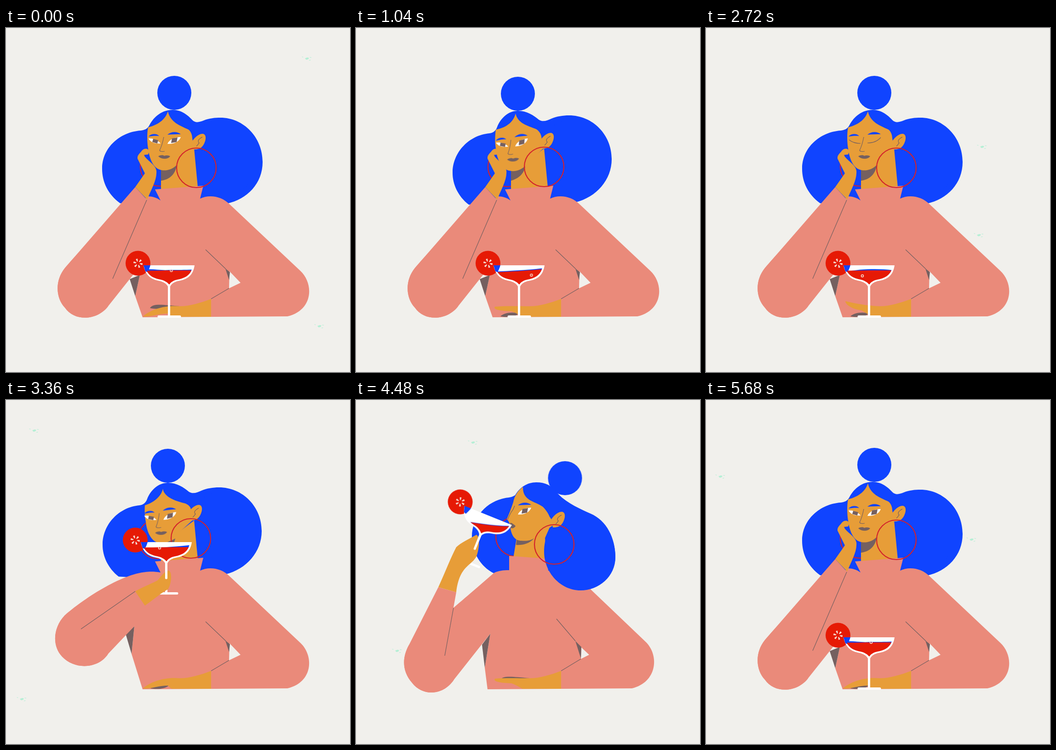
Animation of 748x748 px, one loop 5.76 s. Source, as an HTML page without scripts:

```html
<!DOCTYPE html>
<html lang="en">
<head>
<meta charset="utf-8">
<title>Cocktail hour</title>
<style>
html, body { margin: 0; width: 100%; height: 100%; overflow: hidden; background: #f1f0ec; }
svg { display: block; width: 100vw; height: 100vh; }
svg * { animation: 5.76s ease-in-out infinite; }

.blue { fill: #1044ff; }
.skin { fill: #e79d38; }
.knit { fill: #ea8a7a; }
.shade { fill: #756060; }
.white { fill: #fff; }
.red { fill: #e61a05; }
.paper { fill: #f1f0ec; }
.line { fill: none; stroke: #756060; stroke-width: 1.2; }
.hoop { fill: none; stroke: #d3202c; stroke-width: 2.2; }
.stem { fill: none; stroke: #fff; stroke-width: 5; stroke-linecap: round; }

/* head */
.bun { animation-name: bun; }
@keyframes bun {
  0%, 6%, 31%, 48%, 95%, 100% { transform: none; }
  16%, 21%, 57%, 59% { transform: translate(-14px, 2px); }
  67%, 80% { transform: translate(88.5px, 29px); }
}
.hair { animation-name: hair; }
@keyframes hair {
  0%, 6%, 31%, 48%, 95%, 100% { d: path("M362 178C382 178 396 190 405 200C412 207 420 205 430 201C442 196 455 195 466 195C517 195 558 238 558 291C558 338 525 372 480 382L360 390L248 381C222 362 209 335 209 306C209 260 248 226 293 223C302 222 308 219 312 211C322 192 340 178 362 178Z"); }
  16%, 21%, 57%, 59% { d: path("M352 180C372 180 386 190 397 199C405 205 415 202 425 197C437 192 450 190 463 190C515 190 556 232 556 285C556 330 523 368 477 379L360 390L245 384C222 366 210 340 210 315C210 270 246 233 290 229C298 228 304 224 307 215C315 195 332 180 352 180Z"); }
  67%, 80% { d: path("M392 179C412 179 425 186 436 200C442 208 452 217 462 224C475 232 490 239 505 246C540 258 564 300 564 340C564 380 530 414 488 414L400 370L300 377C270 362 252 330 252 297C252 255 285 220 325 213C333 212 340 211 346 207C356 190 372 179 392 179Z"); }
}
.lock { animation-name: lock; }
@keyframes lock {
  0%, 59%, 91%, 100% { d: path("M425 215C440 205 455 200 466 200C512 200 548 240 548 288C548 330 520 356 480 360C455 360 435 330 432 315C430 290 430 270 430 262Z"); }
  67%, 80% { d: path("M440 205C460 225 490 238 510 247C545 262 564 300 564 342C564 384 528 414 488 414C445 414 409 375 409 330C409 300 420 280 432 270Z"); }
}
.neck { animation-name: neck; }
@keyframes neck {
  0%, 59%, 95%, 100% { d: path("M337 300L337 352L417 346L409 262L372 290Z"); }
  67%, 80% { d: path("M350 295L342 344L414 348L411 300L422 275Z"); }
}
.chin { animation-name: chin; }
@keyframes chin {
  0%, 6%, 31%, 48%, 95%, 100% { d: path("M337 304C350 308 362 304 371 298C369 318 355 330 337 332Z"); }
  16%, 21%, 57%, 59% { d: path("M337 308C350 310 360 306 368 301C365 318 352 328 337 332Z"); }
  67%, 80% { d: path("M350 300C360 304 375 304 387 301C376 313 362 316 348 315Z"); }
}
.face { animation-name: face; }
@keyframes face {
  0%, 6%, 31%, 48%, 95%, 100% { d: path("M352 181C348 196 334 210 309 216C306 230 307 250 309 262C312 285 320 302 332 307C345 313 362 308 371 298L409 264L405 240C405 234 403 226 397 221C378 212 357 205 352 181Z"); }
  16%, 21% { d: path("M347 186C343 202 330 216 304 221C302 235 302 250 304 262C306 285 316 303 329 309C343 314 358 310 367 300L407 262L403 236C402 230 398 224 392 220C373 212 352 208 347 186Z"); }
  57%, 59% { d: path("M341 193C339 206 325 222 302 229C301 240 302 255 304 265C306 285 314 303 327 309C340 314 356 310 363 300L405 262L402 238C401 232 397 228 390 225C370 220 344 212 341 193Z"); }
  67%, 80% { d: path("M363 189C352 196 344 210 342 222C338 235 331 252 328 259C333 264 335 270 336 280C339 296 346 306 360 306C370 307 380 306 388 300L432 270L421 254C418 246 412 238 406 232C390 220 362 220 363 189Z"); }
}
.features { transform-origin: 345px 262px; animation-name: features; }
@keyframes features {
  0%, 6%, 31%, 48%, 67%, 80%, 95%, 100% { transform: none; }
  16%, 21% { transform: translate(-4px, 6px) rotate(-5deg); }
  57%, 59% { transform: translate(-8px, 9px) rotate(-4deg); }
}
.far { animation-name: far; }
@keyframes far {
  0%, 61%, 88%, 100% { opacity: 1; transform: none; }
  63%, 85% { opacity: 0; transform: translate(8px, 0); }
}
.near { animation-name: near; }
@keyframes near {
  0%, 59%, 95%, 100% { transform: none; }
  67%, 80% { transform: translate(1px, -3px); }
}
.open { animation: open 5.76s step-end infinite; }
@keyframes open { 0%, 49.9% { opacity: 1; } 45.8% { opacity: 0; } }
.shut { animation: shut 5.76s step-end infinite; }
@keyframes shut { 0%, 49.9% { opacity: 0; } 45.8% { opacity: 1; } }
.nose { animation-name: nose; }
@keyframes nose {
  0%, 59%, 95%, 100% { d: path("M343 237C341 248 338 258 334 266C335 269 341 269 345 268"); }
  67%, 80% { d: path("M345 230C343 235 341 240 338 243C334 250 331 256 330 260"); }
}
.mouth { animation-name: mouth; }
@keyframes mouth {
  0%, 59%, 95%, 100% { d: path("M331 279C336 276 341 276 344 278C350 276 354 277 357 279C352 286 338 286 331 279Z"); }
  67%, 80% { d: path("M335 267C338 267 340 268 342 270C344 271 345 272 347 274C344 279 339 280 336 278Z"); }
}
.ear { animation-name: ear; }
@keyframes ear {
  0%, 6%, 31%, 48%, 95%, 100% { transform: none; }
  16%, 21% { transform: translate(-4px, -2px); }
  57%, 59% { transform: translate(-8px, -2px); }
  67%, 80% { transform: translate(20px, 13px); }
}
.hoop { animation-name: hoop; }
@keyframes hoop {
  0%, 6%, 31%, 48%, 95%, 100% { transform: none; }
  16%, 21% { transform: translate(-5px, -2px); }
  57%, 59% { transform: translate(-12px, -3px); }
  67%, 80% { transform: translate(17px, 10px); }
}
.hoop.back { animation-name: hoop-back; }
@keyframes hoop-back {
  0%, 6%, 31%, 48%, 95%, 100% { transform: none; }
  16%, 21%, 57%, 59% { transform: translate(-5px, 1px); }
  67%, 80% { transform: translate(12px, -4px); }
}

/* torso */
.torso { animation-name: torso; }
@keyframes torso {
  0%, 47.2%, 91%, 100% { d: path("M324 351L429 343L422 371C440 362 468 364 487 384L640 528C670 556 668 614 612 627L297 629L281 583L291 537L308 366C318 366 328 369 336 375Z"); }
  58.3% { d: path("M324 351L429 343L422 371C440 362 468 364 487 384L640 528C670 556 668 614 612 627L297 629L273 552L279 492L303 374C312 373 325 373 336 375Z"); }
  67%, 80% { d: path("M333 339L416 345L418 371C440 372 478 385 500 402L630 526C660 555 655 614 600 627L286 629L280 582L292 508L300 376C310 371 320 370 333 370Z"); }
}
.pit { animation-name: pit; }
@keyframes pit {
  0%, 47.2%, 91%, 100% { d: path("M269 546L291 537L281 583Z"); }
  58.3% { d: path("M260 508L279 492L273 552Z"); }
  67%, 80% { d: path("M274 532L292 508L280 582Z"); }
}
.gap { animation-name: gap; }
@keyframes gap {
  0%, 59%, 91%, 100% { d: path("M486 529L510 554L485 566Z"); }
  67%, 80% { d: path("M490 538L507 554L489 563Z"); }
}
.fold { animation-name: fold; }
@keyframes fold {
  0%, 59%, 91%, 100% { d: path("M477 523L487 531L485 548Z"); }
  67%, 80% { d: path("M477 524L490 537L489 562Z"); }
}
.crease { animation-name: crease; }
@keyframes crease {
  0%, 59%, 91%, 100% { d: path("M434 482L478 524M446 589L485 566"); }
  67%, 80% { d: path("M436 476L477 524M446 589L489 563"); }
}

/* lifting arm: cheek, table, chest, lips */
.upper { animation-name: upper; }
@keyframes upper {
  0%, 47.2%, 95%, 100% { d: path("M308 367L330 420L280 532L222 605C200 635 150 640 128 608C107 585 107 548 128 522C170 474 200 440 308 367Z"); }
  52%, 89% { d: path("M306 370L335 420L285 510L222 590C202 622 150 628 124 598C103 575 103 535 128 505C170 460 220 400 306 370Z"); }
  58.3%, 84.5% { d: path("M305 374L335 420L279 492C252 514 238 532 222 552C202 584 150 588 122 558C100 535 102 495 128 468C165 435 250 378 305 374Z"); d: path("M305 374L335 420L279 492L222 552C202 584 150 588 122 558C100 535 102 495 128 468C165 435 250 378 305 374Z"); }
  66%, 80% { d: path("M300 376L330 420L292 508L213 608C190 643 145 645 122 615C100 590 100 560 115 533C180 480 212 452 300 376Z"); }
}
.fore { animation-name: fore; }
@keyframes fore {
  0%, 47.2%, 95%, 100% { d: path("M281 346L306 373L232 544L222 605C200 635 150 640 128 608C107 585 107 548 128 522Z"); }
  52%, 89% { d: path("M262 548L270 590L235 600L222 605C200 635 150 636 124 605C103 580 103 545 128 515Z"); }
  58.3%, 84.5% { d: path("M281 416L302 447L240 520L222 552C202 584 150 588 122 558C100 535 102 495 128 468Z"); }
  66%, 80% { d: path("M179 407L218 418L193 556L213 608C190 643 145 645 122 615C100 590 100 560 115 533Z"); }
}
.seam { animation-name: seam; }
@keyframes seam {
  0%, 47.2%, 95%, 100% { d: path("M306 374L232 545"); }
  52%, 89% { d: path("M262 548L180 540"); }
  58.3%, 84.5% { d: path("M281 416L163 498"); }
  66%, 80% { d: path("M212 452L193 556"); }
}
.cheek { animation: cheek 5.76s step-end infinite; }
@keyframes cheek { 0%, 94.5% { opacity: 1; } 47.6% { opacity: 0; } }
.grip { animation-name: grip, grip-on; animation-timing-function: ease-in-out, step-end; }
@keyframes grip-on { 0%, 94.5% { opacity: 0; } 47.6% { opacity: 1; } }
@keyframes grip {
  0%, 47.2%, 95%, 100% { d: path("M281 346C285 330 300 310 302 300C300 280 310 265 318 268C330 290 335 310 327 330C320 350 312 360 306 373Z"); }
  52%, 89% { d: path("M262 548C290 552 310 560 328 566C338 562 348 560 354 562C364 567 362 592 354 600C340 606 300 600 270 590Z"); }
  58.3%, 84.5% { d: path("M281 416C300 405 320 398 330 392C338 382 345 372 354 371C362 374 360 400 352 412C340 417 320 435 302 447Z"); }
  66%, 80% { d: path("M179 407C195 372 205 345 218 320C228 310 245 303 262 293C272 300 266 330 262 340C250 362 225 360 218 418Z"); }
}

/* drumming fingers */
.fingers { animation: fingers 1.92s ease-in-out infinite; }
@keyframes fingers {
  0%, 20%, 70%, 100% { d: path("M446 589C425 597 400 605 378 605C345 602 315 612 298 627C310 630 330 621 352 621C356 624 358 628 362 628L446 628Z"); }
  33%, 54% { d: path("M446 589C425 597 400 605 378 605C350 605 325 604 302 606C298 612 310 615 338 616C345 618 355 624 362 628L446 628Z"); }
  42% { d: path("M446 589C425 597 400 605 378 605C350 604 325 599 303 594C303 600 315 611 338 614C345 618 355 624 362 628L446 628Z"); }
}
.under { animation: under 1.92s linear infinite; }
@keyframes under {
  0%, 34%, 100% { d: path("M313 609C320 598 340 602 378 605C360 606 335 614 313 609Z"); }
  41%, 97% { d: path("M314 627C320 620 340 616 354 621C345 628 330 630 314 627Z"); }
}

/* glass */
.glass { transform-origin: 354.5px 516px; animation-name: glass; }
@keyframes glass {
  0%, 52%, 89%, 100% { transform: none; }
  58.3%, 84.5% { transform: translate(-6px, -207px); }
  66%, 80% { transform: translate(-67px, -265px) rotate(22deg); }
}
.drink { animation-name: drink; }
@keyframes drink {
  0%, 33%, 48%, 58.3%, 91%, 100% { d: path("M300 528C330 527 370 527 410 527L410 570L300 570Z"); }
  18% { d: path("M300 531C330 530 370 528 410 524L410 570L300 570Z"); }
  66%, 80% { d: path("M300 550C330 542 370 536 410 519L410 570L300 570Z"); }
}
.surface { animation-name: surface; }
@keyframes surface {
  0%, 95%, 100% { d: path("M300 526C315 522 335 528 356 526C375 526 390 526 410 525L410 532L300 532Z"); }
  18%, 58.3% { d: path("M300 530C330 528 370 527 410 522L410 530L300 534Z"); }
  33%, 48% { d: path("M300 531C335 523 380 523 410 527L410 532L300 534Z"); }
  66%, 80% { d: path("M300 550C330 541 370 535 410 518L410 530L300 555Z"); }
}
.bubble { animation-name: bubble; animation-timing-function: linear; }
@keyframes bubble {
  0% { transform: translate(359px, 527px); opacity: 1; }
  1%, 10% { transform: translate(385px, 548px); opacity: 0; }
  12% { transform: translate(384px, 545px); opacity: 1; }
  24% { transform: translate(379px, 530px); opacity: 1; }
  25%, 42% { transform: translate(340px, 546px); opacity: 0; }
  44%, 47.2% { transform: translate(340px, 539px); opacity: 1; }
  59% { transform: translate(340px, 528px); opacity: 1; }
  60%, 90% { transform: translate(357px, 547px); opacity: 0; }
  92% { transform: translate(357px, 543px); opacity: 1; }
  98%, 100% { transform: translate(359px, 527px); opacity: 1; }
}

/* mint flecks jump about the backdrop */
.fleck { fill: #b5efd5; animation: fleck-a 5.76s step-end infinite; }
.fleck.b { animation-name: fleck-b; }
@keyframes fleck-a {
  0% { transform: translate(655px, 66px); }
  1.4%, 19.4% { transform: translate(140px, 640px); }
  16.6%, 34.7% { transform: translate(-99px, -99px); }
  33.3% { transform: translate(460px, 94px); }
  47.2% { transform: translate(601px, 258px); }
  48.6%, 79.1% { transform: translate(110px, 170px); }
  58.3% { transform: translate(62px, 66px); }
  59.7% { transform: translate(640px, 120px); }
  77.7% { transform: translate(255px, 92px); }
  98.6% { transform: translate(32px, 166px); }
}
@keyframes fleck-b {
  0% { transform: translate(682px, 648px); }
  1.4%, 19.4% { transform: translate(620px, 150px); }
  16.6%, 48.6% { transform: translate(-99px, -99px); }
  33.3% { transform: translate(726px, 391px); }
  34.7%, 59.7% { transform: translate(60px, 450px); }
  47.2% { transform: translate(594px, 450px); }
  58.3% { transform: translate(35px, 650px); }
  77.7% { transform: translate(90px, 545px); }
  79.1% { transform: translate(690px, 600px); }
  98.6% { transform: translate(578px, 303px); }
}
</style>
</head>
<body>
<svg viewBox="0 0 748 748">
  <defs>
    <path id="fleck" d="M-5 0l5-2 4 1-2 3-4 1zM5-3l5 1-3 1zM-12-4l4 1-2 1zM3 4l5-1-2 2z"/>
    <clipPath id="bowl"><path d="M303 516H406C404 530 398 541 378 546C364 548 358 553 355 558C351 553 344 548 331 546C311 541 305 530 303 516Z"/></clipPath>
  </defs>
  <rect class="paper" width="748" height="748"/>
  <use class="fleck" href="#fleck"/>
  <use class="fleck b" href="#fleck"/>

  <circle class="blue bun" cx="366" cy="141" r="37"/>
  <path class="blue hair"/>
  <circle class="hoop back" cx="335" cy="301" r="43"/>
  <path class="skin neck"/>
  <path class="shade chin"/>
  <path class="knit torso"/>
  <path class="paper gap"/>
  <path class="shade fold"/>
  <path class="line crease"/>
  <path class="blue lock"/>

  <path class="skin face"/>
  <g class="features">
    <g class="far">
      <path class="blue" d="M310 236C316 229 328 229 333 235C325 234 318 235 310 236Z"/>
      <g class="open">
        <path class="white" d="M310 240C320 240 330 243 336 251C325 252 314 249 310 240Z"/>
        <path class="shade" d="M320 241L331 244L329 251L318 248Z"/>
      </g>
      <path class="line shut" d="M311 243C318 249 328 251 336 251"/>
    </g>
    <g class="near">
      <path class="blue" d="M351 232C360 224 373 225 380 231C370 231 360 231 351 232Z"/>
      <g class="open">
        <path class="white" d="M351 252C355 242 368 237 380 237C377 247 365 253 351 252Z"/>
        <path class="shade" d="M361 240L373 238L371 248L359 250Z"/>
      </g>
      <path class="line shut" d="M351 250C362 250 373 246 380 238"/>
    </g>
    <path class="line nose"/>
    <path class="shade mouth"/>
  </g>
  <g class="ear">
    <path class="skin" d="M405 246C412 236 420 230 428 230C438 232 434 248 428 256C422 264 414 264 408 264Z"/>
    <path class="line" d="M427 237C418 242 416 246 420 250C418 252 416 256 414 257"/>
  </g>
  <circle class="hoop" cx="414" cy="304" r="43"/>

  <path class="shade pit"/>
  <path class="knit upper"/>
  <path class="knit fore"/>
  <path class="line seam"/>
  <path class="skin cheek" d="M281 346L302 316L286 284C285 276 292 272 296 266C302 260 312 262 311 270L309 275L300 276L302 280C312 292 325 298 327 310C329 330 315 352 307 373Z"/>
  <path class="shade under"/>
  <path class="skin fingers"/>

  <g class="glass">
    <circle class="red" cx="287" cy="511.500" r="27"/>
    <circle cx="287" cy="511.500" r="7" fill="none" stroke="#f6dfd6" stroke-width="6" stroke-dasharray="2.800 4.530"/>
    <path class="white" d="M299 516H410C408 530 402 544 380 549C366 551 360 556 357 562H352C349 556 342 551 329 549C308 544 302 530 299 516Z"/>
    <path class="blue" d="M299 516H314L312 522L308 531L303 529Z"/>
    <g clip-path="url(#bowl)">
      <path class="blue surface"/>
      <path class="red drink"/>
      <circle class="bubble" r="2.500" fill="none" stroke="#f6dfd6" stroke-width="1.500"/>
    </g>
    <path class="stem" d="M354.500 560V627M332 627.500H378"/>
  </g>
  <path class="skin grip"/>
  <path class="stem glass" d="M354.500 562V594"/>
</svg>
</body>
</html>
```
